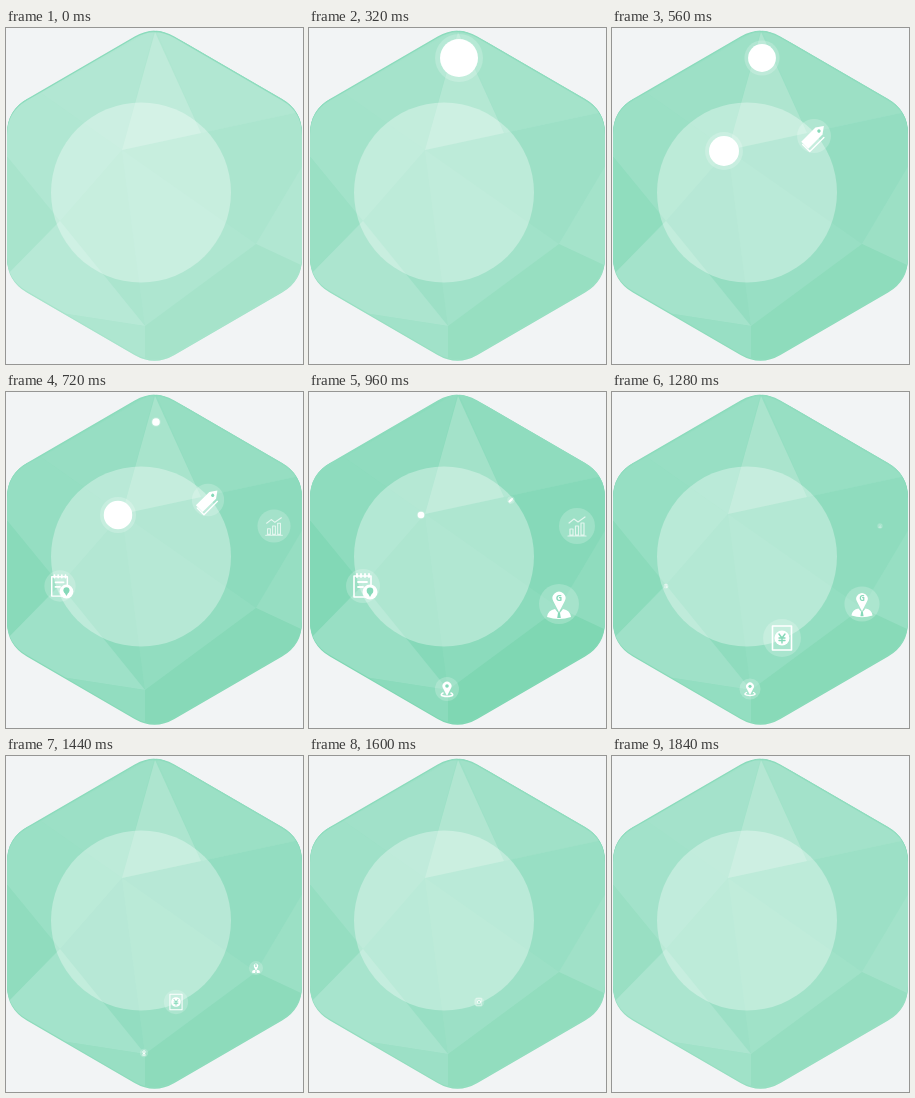
An HTML page for the animation above (1.92 s loop, 297 by 336 pixels).

```html
<!DOCTYPE html>
<html lang="zh">
<head>
<meta charset="utf-8">
<title>Hexagon badge</title>
<style>
  html, body { margin: 0; width: 100%; height: 100%; overflow: hidden; background: #f2f4f5; }
  svg { display: block; width: 100%; height: 100%; }
  .solid { fill: #fff; }
  .line { fill: none; stroke: #fff; stroke-linecap: round; stroke-linejoin: round; }
  .cut { fill: #86d9b9; }
  .cutline { fill: none; stroke: #86d9b9; stroke-linecap: round; }
  text { font-family: "Open Sans", "Noto Sans", sans-serif; font-weight: 700; text-anchor: middle; }
</style>
</head>
<body>
<svg viewBox="0 0 297 336">
  <defs>
    <clipPath id="hexClip"><path id="hexShape"/></clipPath>
  </defs>
  <path id="rim" fill="#7fd7b3"/>
  <g clip-path="url(#hexClip)">
    <g id="facets"></g>
  </g>
  <path id="veil" fill="#fff"/>
  <circle cx="135" cy="164.5" r="90" fill="#fff" opacity=".33"/>
  <g id="icons"></g>
</svg>
<script>
const LOOP = 1920, STEP = 80;
const $ = id => document.getElementById(id);

// Hexagon outline with softened corners
const corners = [[148.5, -1.5], [296, 84], [296, 253], [148.5, 338.5], [1, 253], [1, 84]];
function roundedPath(points, cut) {
  const toward = (a, b) => {
    const k = cut / Math.hypot(b[0] - a[0], b[1] - a[1]);
    return [a[0] + (b[0] - a[0]) * k, a[1] + (b[1] - a[1]) * k];
  };
  const n = points.length;
  return points.map((p, i) => {
    const from = toward(p, points[(i + n - 1) % n]);
    const to = toward(p, points[(i + 1) % n]);
    return `${i ? 'L' : 'M'}${from}Q${p} ${to}`;
  }).join('') + 'Z';
}
const outline = roundedPath(corners, 23);
$('rim').setAttribute('d', outline);
$('veil').setAttribute('d', outline);
$('hexShape').setAttribute('d', roundedPath(corners.map(([x, y]) => [x, y - 1.5]), 23));

const facets = [
  ['#8bdbbc', '0,0 297,0 297,336 0,336'],
  ['#90dcbf', '149,0 35,65 116,122'],
  ['#8edcbe', '35,65 116,122 54,193 0,127 0,80'],
  ['#82d8b6', '0,127 54,193 5,243 0,248'],
  ['#86d9b9', '54,193 116,122 139,298'],
  ['#98dfc4', '54,193 139,298 55,285 0,262 0,248'],
  ['#8bdbbc', '55,285 139,298 139,336 60,336'],
  ['#8bdbbc', '116,122 250,216 139,298'],
  ['#86d9b9', '116,122 290,85 297,83 297,137 250,216'],
  ['#8fdcbe', '149,0 297,70 297,83 195,105'],
  ['#a3e2c9', '149,4 195,105 116,122'],
  ['#8fdcbe', '297,137 250,216 297,238'],
  ['#7fd7b3', '250,216 297,238 297,336 139,336 139,298']
];
$('facets').innerHTML = facets
  .map(([fill, points]) => `<polygon fill="${fill}" points="${points}"/>`).join('');

const pin = (y, r) =>
  `<path class="solid" d="M0 ${y + 2.2 * r}L${-r * .85} ${y + r * .55}A${r} ${r} 0 1 1 ${r * .85} ${y + r * .55}Z"/>`;

const art = {
  seal: '<circle class="solid" r="19"/>',
  globe: '<circle class="solid" r="15"/>',
  tag: `<g transform="rotate(45)">
      <path class="solid" d="M-5 13V-7L0 -14L5 -7V13Z"/>
      <path class="line" stroke-width="1.4" d="M8 -6V14H-2"/>
      <circle class="cut" cy="-7" r="1.7"/></g>`,
  chart: `<g opacity=".7"><path class="line" stroke-width="1.2"
      d="M-7 9V3H-4V9ZM-1.5 9V0H1.5V9ZM4 9V-3H7V9ZM-9 10H9M-8 -3L-3 -7L1 -4L8 -9"/></g>`,
  note: `<path class="line" stroke-width="1.6" d="M-9 -10H8V11H-9Z"/>
    <path class="line" stroke-width="1.8" d="M-6 -12V-9M-2 -12V-9M2 -12V-9M6 -12V-9M-5 -4H4M-5 1H0"/>
    <circle class="solid" cx="7" cy="6" r="7.5"/>
    <circle class="cut" cx="7" cy="4.7" r="3.3"/><path class="cut" d="M4.5 6.5H9.5L7 11Z"/>`,
  person: `<path class="solid" d="M-12 13Q-11 6 -4 5L0 10L4 5Q11 6 12 13Q0 17 -12 13Z"/>
    ${pin(-6, 6.5)}
    <text class="cut" y="-3" font-size="9">G</text>
    <path class="cut" d="M-1 9H1L1.8 14H-1.8Z"/>`,
  place: `<path class="line" stroke-width="1.5" d="M-4 4Q-9 7 0 7.5Q9 7 4 4"/>
    ${pin(-3, 4.5)}<circle class="cut" cy="-3" r="1.8"/>`,
  bill: `<path class="line" stroke-width="1.6" d="M-9.5 -12H9.5V12H-9.5Z"/>
    <circle class="solid" r="7.5"/>
    <path class="cutline" stroke-width="1.4" d="M-3 -4L0 0L3 -4M0 0V5M-3 0H3M-3 2.5H3"/>`
};

// name, x, y, halo radius, [time, scale] steps
const early = [[400, 0], [560, 1], [720, .95], [960, .22], [1030, 0]];
const middle = [[560, 0], [720, .92], [960, 1], [1280, .15], [1350, 0]];
const late = [[760, 0], [960, 1], [1280, .88], [1440, .35], [1550, 0]];
const icons = [
  ['seal', 150, 30, 24, [[80, 0], [160, .35], [320, 1], [480, 1], [720, .2], [790, 0]]],
  ['globe', 112, 123, 19, early],
  ['tag', 202, 108, 17, early],
  ['chart', 268, 134, 18, middle],
  ['note', 54, 194, 17, middle],
  ['person', 250, 212, 20, late],
  ['place', 138, 297, 12, late],
  ['bill', 170, 246, 19, [[1040, 0], [1200, 1], [1280, 1], [1600, .28], [1670, 0]]]
];
$('icons').innerHTML = icons.map(([name, , , halo]) =>
  `<g><circle r="${halo}" fill="#fff" opacity=".2"/>${art[name]}</g>`).join('');
const nodes = [...$('icons').children];

const veilSteps = [[0, .3], [160, .25], [320, .19], [720, .06], [960, 0], [1280, .07], [1600, .15], [1840, .18]];

function valueAt(steps, time) {
  const next = steps.findIndex(([at]) => at > time);
  if (next === 0) return steps[0][1];
  if (next < 0) return steps[steps.length - 1][1];
  const [t0, v0] = steps[next - 1], [t1, v1] = steps[next];
  return v0 + (v1 - v0) * (time - t0) / (t1 - t0);
}

function draw(elapsed) {
  let time = Math.floor(elapsed % LOOP / STEP) * STEP;
  if (time < 160) time = 0;
  $('veil').setAttribute('opacity', valueAt(veilSteps, time));
  icons.forEach(([, x, y, , steps], i) => {
    const scale = valueAt(steps, time);
    nodes[i].style.display = scale > 0 ? '' : 'none';
    nodes[i].setAttribute('transform', `translate(${x} ${y}) scale(${scale})`);
  });
}

const start = performance.now();
function tick() {
  draw(performance.now() - start);
  requestAnimationFrame(tick);
}
tick();
</script>
</body>
</html>
```
